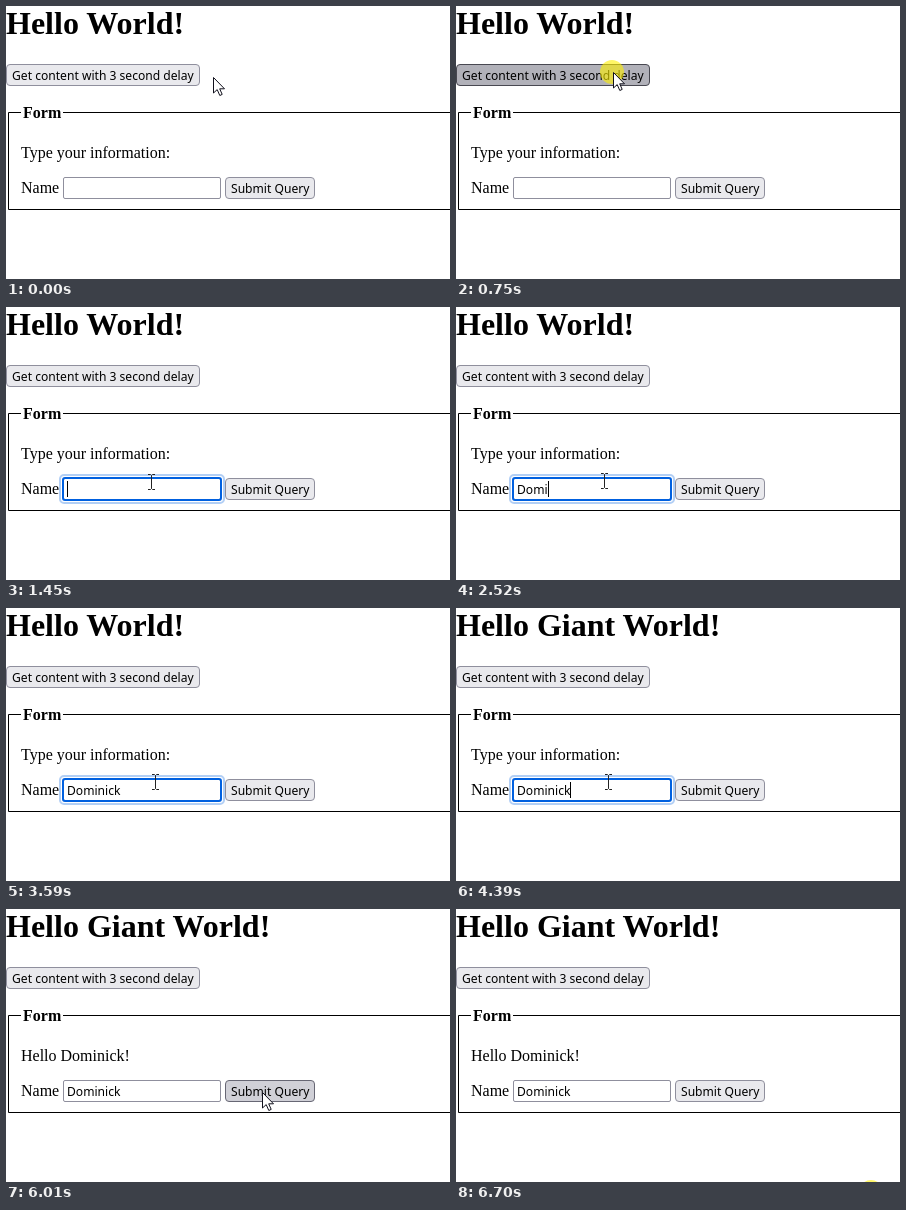
Animation, 444 px wide and 273 px high, one loop 6.77 s. Source, as an HTML page:

```html
<!DOCTYPE html>
<html lang="en">
<head>
<meta charset="utf-8">
<title>Form demo</title>
<style>
  html, body { margin: 0; width: 100%; height: 100%; overflow: hidden; background: #fff; }
  svg { display: block; width: 444px; height: 273px; }
  text { font: 16px "Liberation Serif", serif; white-space: pre; }
  .title { font-size: 32px; font-weight: bold; }
  .legend { font-weight: bold; }
  .ui { font: 12.1px "Noto Sans", sans-serif; }
  .button rect { fill: #e9e9ed; stroke: #8f8f9d; }
  .button.hover rect { fill: #d0d0d7; stroke: #676774; }
  .button.active rect { fill: #b1b1b9; stroke: #484851; }
  .field { fill: #fff; stroke: #8f8f9d; }
  .ring { fill: none; stroke: #0060df; stroke-width: 2; }
</style>
</head>
<body>
<svg viewBox="0 0 444 273">
  <text class="title" id="title" x="0" y="28">Hello World!</text>

  <g class="button" id="fetch">
    <rect x=".5" y="58.5" width="193" height="21" rx="3.5"/>
    <text class="ui" x="6" y="74">Get content with 3 second delay</text>
  </g>

  <path d="M15 106.5H2.5V203.5H444M57 106.5H444" fill="none" stroke="#000"/>
  <text class="legend" x="17" y="112">Form</text>
  <text id="message" x="15" y="152"></text>
  <text x="15" y="187">Name</text>

  <g class="button" id="submit">
    <rect x="219.5" y="171.5" width="89" height="21" rx="3.5"/>
    <text class="ui" x="225" y="187">Submit Query</text>
  </g>

  <rect class="field" x="57.5" y="171.5" width="157" height="21" rx="1.5"/>
  <g class="ring" id="focus">
    <rect x="54" y="168" width="164" height="28" rx="4" stroke-opacity=".3"/>
    <rect x="57" y="171" width="158" height="22" rx="2"/>
  </g>
  <text class="ui" id="value" x="61" y="187"></text>
  <rect id="caret" y="174" width="1" height="16"/>

  <circle id="click" r="12" fill="#fff000" fill-opacity=".6"/>
  <g id="pointer">
    <path id="arrow" d="M.5 .5V16L4.2 12.6L6.8 18.5L9.2 17.4L6.7 11.8H11.5Z" fill="#fff" stroke="#10101c"/>
    <path id="beam" d="M-3 -7.5H-.5L.5 -6.5L1.5 -7.5H4M.5 -6.5V6.5M-3 7.5H-.5L.5 6.5L1.5 7.5H4" fill="none" stroke="#222"/>
  </g>
</svg>
<script>
const LOOP = 6770, SAMPLE = 65.5, BLINK = 530;
const NAME = "Dominick", TYPE_START = 2110, KEY_GAP = 135;
const FOCUS = 1320, TITLE = 3860, SENT = 5410;
const CLICKS = [670, 1250, 6690], CLICK_TIME = 145;

const HOME = { x: 207, y: 71 };
const MOVES = [
  { start: 200, end: 600, x: 157, y: 66 },
  { start: 820, end: 1400, x: 145, y: 175 },
  { start: 1900, end: 3260, x: 149, y: 174 },
  { start: 4380, end: 5180, x: 256, y: 183 },
  { start: 6000, end: 6690, x: 416, y: 283 }
];

const $ = id => document.getElementById(id);
const clamp = (v, lo, hi) => Math.min(hi, Math.max(lo, v));
const easeOut = u => 1 - (1 - u) ** 3;
const show = (id, on) => { $(id).style.display = on ? "" : "none"; };
const write = (id, text) => { if ($(id).textContent !== text) $(id).textContent = text; };
const setClass = (id, state) => $(id).setAttribute("class", "button " + state);
const inside = (p, x, y, w, h) => p.x >= x && p.x < x + w && p.y >= y && p.y < y + h;

// The pointer moves in steps, like a screen recording.
function pointerAt(time) {
  const t = Math.floor(time / SAMPLE + 0.05) * SAMPLE;
  let { x, y } = HOME;
  for (const m of MOVES) {
    const f = easeOut(clamp((t - m.start) / (m.end - m.start), 0, 1));
    x += (m.x - x) * f;
    y += (m.y - y) * f;
  }
  return { x: Math.round(x), y: Math.round(y) };
}

function draw(t) {
  const p = pointerAt(t);
  const pressed = CLICKS.some(c => t >= c && t < c + CLICK_TIME);
  const overText = inside(p, 57, 171, 158, 22) || inside(p, 15, 138, 149, 18);
  const focused = t >= FOCUS && t < SENT;
  const typed = clamp(Math.floor((t - TYPE_START) / KEY_GAP) + 1, 0, NAME.length);
  const lastInput = typed ? TYPE_START + (typed - 1) * KEY_GAP : FOCUS;

  write("title", t < TITLE ? "Hello World!" : "Hello Giant World!");
  write("message", t < SENT ? "Type your information:" : `Hello ${NAME}!`);
  write("value", NAME.slice(0, typed));

  setClass("fetch", inside(p, 0, 58, 194, 22) ? pressed ? "active" : "hover" : "");
  setClass("submit", inside(p, 219, 171, 90, 22) ? "hover" : "");

  show("focus", focused);
  show("caret", focused && Math.floor((t - lastInput) / BLINK) % 2 === 0);
  $("caret").setAttribute("x", Math.round(61 + $("value").getComputedTextLength()));

  show("click", pressed);
  $("click").setAttribute("cx", p.x - 1);
  $("click").setAttribute("cy", p.y);

  $("pointer").setAttribute("transform", `translate(${p.x} ${p.y})`);
  show("arrow", !overText);
  show("beam", overText);
}

const start = performance.now();
function tick() {
  draw((performance.now() - start) % LOOP);
  requestAnimationFrame(tick);
}
tick();
</script>
</body>
</html>
```
